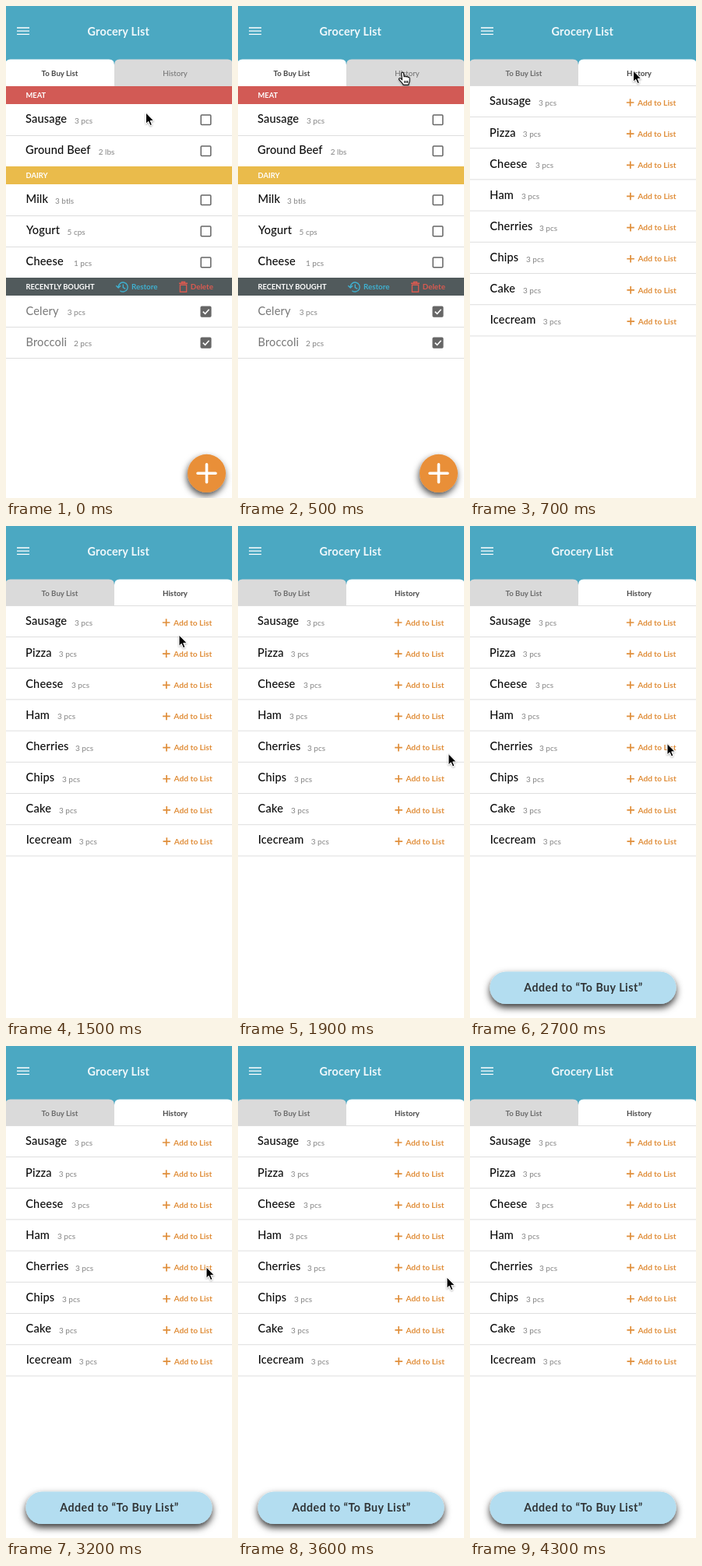
Write an HTML page that moves like this. It is 290 px wide and 632 px high and loops after 4400 ms.

```html
<!DOCTYPE html>
<html lang="en">
<head>
<meta charset="utf-8">
<title>Grocery List</title>
<style>
  html, body { margin: 0; width: 100%; height: 100%; overflow: hidden; background: #fff; }
  svg { display: block; width: 290px; height: 632px; font-family: Lato, "Open Sans", sans-serif; }
  .title { font-size: 14.4px; font-weight: 700; letter-spacing: .2px; fill: #f0f8fb; }
  .tab { font-size: 9.7px; fill: #6c6c6c; }
  .bold { font-weight: 700; }
  .on { fill: #484848; }
  .name { font-size: 14.6px; font-weight: 500; letter-spacing: .15px; fill: #0c0c0c; }
  .name.done { font-weight: 400; fill: #777; }
  .qty { font-size: 10px; fill: #858585; }
  .head { font-size: 9.4px; font-weight: 700; fill: #fff; }
  .act { font-size: 9.8px; font-weight: 700; }
  .add { font-size: 10.2px; font-weight: 700; fill: #e08e3a; }
  .toast { font-size: 14.2px; font-weight: 700; letter-spacing: .5px; fill: #303436; }
</style>
</head>
<body>
<svg viewBox="0 0 290 632">
  <defs>
    <filter id="fabShade" x="-50%" y="-50%" width="200%" height="200%">
      <feDropShadow dx="-1" dy="4" stdDeviation="4" flood-color="#000" flood-opacity=".7"/>
    </filter>
    <filter id="toastShade" x="-20%" y="-50%" width="140%" height="220%">
      <feDropShadow dx="0" dy="4.5" stdDeviation="4.8" flood-color="#000" flood-opacity=".8"/>
    </filter>
    <filter id="cursorShade" x="-50%" y="-50%" width="200%" height="200%">
      <feDropShadow dx="0" dy="1" stdDeviation=".8" flood-color="#000" flood-opacity=".35"/>
    </filter>
  </defs>
  <rect width="290" height="632" fill="#fff"/>
  <rect width="290" height="103" fill="#4ba8c2"/>
  <path d="M14 28H30M14 32.2H30M14 36.4H30" stroke="#fff" stroke-width="1.3"/>
  <text class="title" x="144.3" y="37.8" text-anchor="middle">Grocery List</text>
  <g id="buy"></g>
  <g id="history"></g>
  <g id="toast">
    <rect x="25.5" y="572.5" width="239" height="41.5" rx="20.7" fill="#b3ddf0" filter="url(#toastShade)"/>
    <text class="toast" x="145.5" y="598" text-anchor="middle">Added to “To Buy List”</text>
  </g>
  <g id="cursor" filter="url(#cursorShade)">
    <path id="arrow" d="M0 0V14.3L3.2 11.3L5.5 16.6L7.9 15.6L5.7 10.4H10.2Z" fill="#000" stroke="#fff" stroke-linejoin="round"/>
    <path id="hand" d="M.2 3.6C.2 1.6 2.8 1.6 3 3.6L3.6 8C4 6.7 6 6.8 6.2 8.2C6.8 7.1 8.5 7.4 8.6 8.8C9.4 8 10.7 8.6 10.7 10V13C10.7 15 9.5 16 9.4 18.4H2.6C2.4 16.6 -.4 14.6 -2.8 11.4C-3.6 10 -2 9.1 -.7 10.2L1.1 11.8Z M4.2 13V16M6.2 13V16M8.1 13V16" fill="#fff" stroke="#111" stroke-width="1.1" stroke-linejoin="round"/>
  </g>
</svg>
<script>
const LOOP = 4400, STEP = 100;
const $ = id => document.getElementById(id);

const text = (cls, x, y, s, extra = "") => `<text class="${cls}" x="${x}" y="${y}" ${extra}>${s}</text>`;
const rule = y => `<path d="M0 ${y}H290" stroke="#dedede"/>`;
const bar = (y, fill, label) =>
  `<rect y="${y}" width="290" height="23" fill="${fill}"/>` + text("head", 25.5, y + 14.8, label);

function tabs(first) {
  const tab = (x, w, on) =>
    `<path d="M${x} 103V75.5q0 -7 7 -7h${w - 14}q7 0 7 7V103Z" fill="${on ? "#fff" : "#dadada"}"/>`;
  const label = (x, s, cls) => text("tab " + cls, x, 90.4, s, 'text-anchor="middle"');
  return tab(-1, 140, first) + tab(139, 152, !first) +
    label(69, "To Buy List", first ? "bold on" : "bold") + label(217, "History", first ? "" : "bold on");
}

function checkbox(y, done) {
  const box = `<rect x="250.2" y="${y - 6.3}" width="12.6" height="12.6" rx="1" fill="${done ? "#666" : "none"}" stroke="#666" stroke-width="1.5"/>`;
  return box + (done ? `<path d="M252.8 ${y}l2.8 2.8l5 -5.6" fill="none" stroke="#fff" stroke-width="1.6"/>` : "");
}

function item(y, name, x, qty, qx, done) {
  return text(done ? "name done" : "name", x, y - .5, name) + text("qty", qx, y, qty) + checkbox(y - 4.4, done);
}

const restoreIcon = `<g fill="none" stroke="#3fb0d0" stroke-width="1.4">
  <path d="M144.2 361a6 6 0 1 1 2.2 4.7M141.3 359.2l2.9 2.9l2.9 -2.9M150.3 357.4V361.5l3 1.8"/></g>`;
const trashIcon = `<path d="M222 356.2H233M225.5 355.8V354.5H229.5V355.8M223.4 358.2V367.2H231.6V358.2Z" fill="none" stroke="#d95a50" stroke-width="1.4"/>`;

$("buy").innerHTML = tabs(true) +
  [166.5, 269.5, 309.5, 412.5, 452.5].map(rule).join("") +
  bar(103, "#d25a55", "MEAT") +
  item(150.6, "Sausage", 25, "3 pcs", 88, false) +
  item(190.6, "Ground Beef", 25, "2 lbs", 118.7, false) +
  bar(206, "#eabb4b", "DAIRY") +
  item(253.7, "Milk", 25.5, "3 btls", 63, false) +
  item(293.8, "Yogurt", 26, "5 cps", 78.6, false) +
  item(333.8, "Cheese", 25.5, "1 pcs", 87, false) +
  bar(349, "#515a5c", "RECENTLY BOUGHT") +
  restoreIcon + text("act", 161, 364.4, "Restore", 'fill="#3fb0d0"') +
  trashIcon + text("act", 236.8, 364.4, "Delete", 'fill="#d95a50"') +
  item(397, "Celery", 25.5, "3 pcs", 78.7, true) +
  item(437, "Broccoli", 25.5, "2 pcs", 87, true) +
  `<circle cx="257.5" cy="600.3" r="24.5" fill="#e98f38" filter="url(#fabShade)"/>
   <path d="M246 600.3H269M257.5 588.8V611.8" stroke="#fff" stroke-width="3.6" stroke-linecap="round"/>`;

const past = [["Sausage", 88], ["Pizza", 67.8], ["Cheese", 84], ["Ham", 66],
  ["Cherries", 89], ["Chips", 72], ["Cake", 68], ["Icecream", 93.7]];

$("history").innerHTML = tabs(false) + rule(102.5) + past.map(([name, qx], i) => {
  const y = 128 + i * 40.15, dx = i * .1;
  return rule(142.5 + i * 40.2) +
    text("name", 25 + dx, y - .6, name) + text("qty", qx, y, "3 pcs") +
    `<path d="M${200.8 + dx} ${y - 4}h9.6m-4.8 -4.8v9.6" stroke="#e08e3a" stroke-width="1.7"/>` +
    text("add", 215 + dx, y - .4, "Add to List");
}).join("");

// time, x, y of the pointer
const path = [[0, 179.5, 137], [500, 209.5, 83], [700, 209.5, 83], [1200, 222, 140], [1500, 222, 140],
  [1900, 270, 292.5], [2100, 270, 292.5], [2600, 253, 279.5], [2700, 253, 279.5],
  [3200, 257, 284], [3600, 268, 297], [LOOP, 268, 297]];

function pointer(t) {
  const i = path.findIndex(k => k[0] > t);
  const a = path[i - 1], b = path[i];
  const u = (t - a[0]) / (b[0] - a[0]);
  const e = u * u * (3 - 2 * u);
  return [a[1] + (b[1] - a[1]) * e, a[2] + (b[2] - a[2]) * e];
}

const show = (id, on) => { $(id).style.display = on ? "" : "none"; };

function draw(now) {
  const t = Math.floor(now % LOOP / STEP) * STEP;
  const [x, y] = pointer(t);
  const hover = (t >= 400 && t < 700) || (t >= 2400 && t < 2700);
  show("buy", t < 700);
  show("history", t >= 700);
  show("toast", t >= 2700);
  show("cursor", t < 4300);
  show("hand", hover);
  show("arrow", !hover);
  $("cursor").setAttribute("transform", `translate(${x} ${y})`);
}

function frame() {
  draw(performance.now());
  requestAnimationFrame(frame);
}
frame();
</script>
</body>
</html>
```
